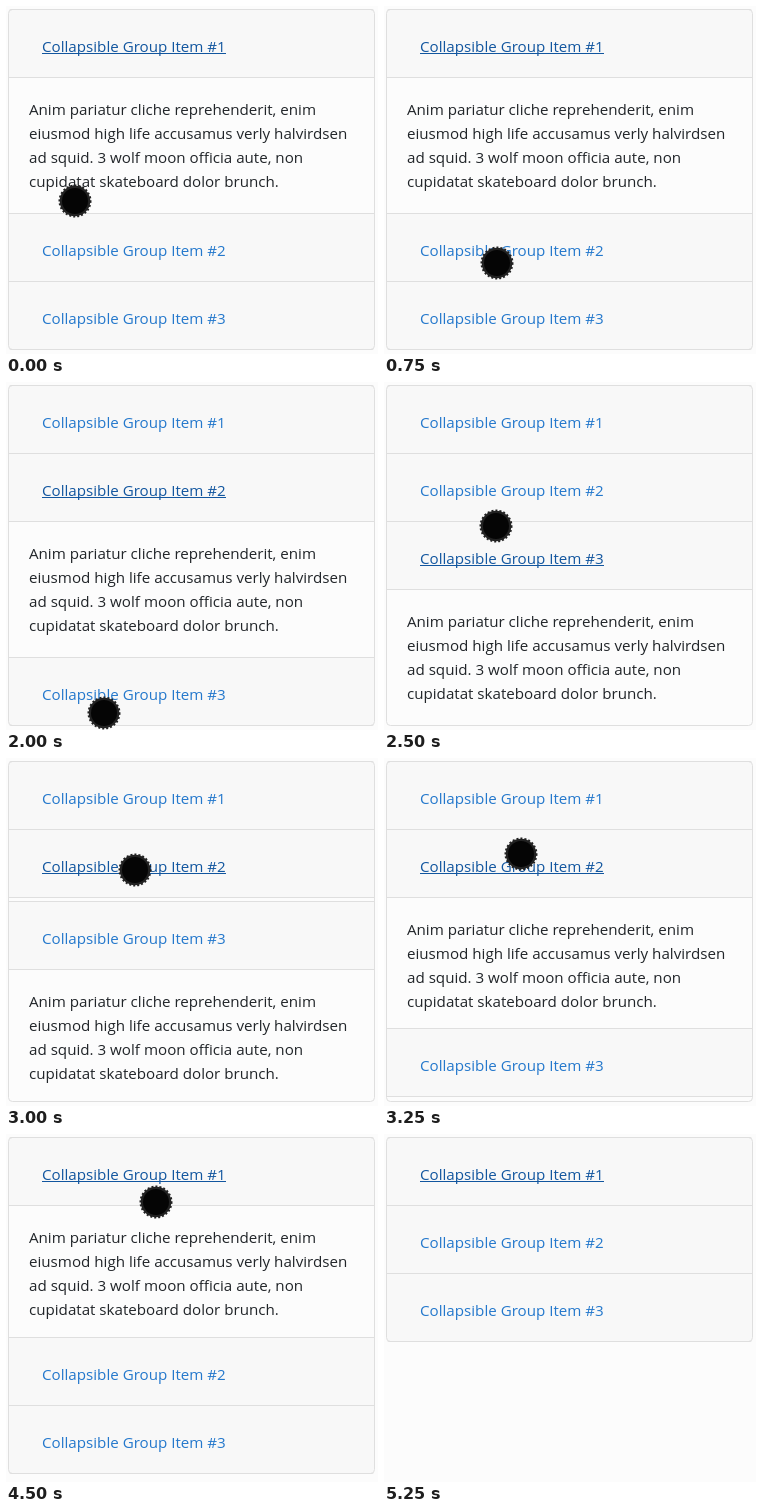
These frames come from a looping animation (372 by 348 pixels, 5.75 s). An HTML page with a canvas:

```html
<!DOCTYPE html>
<html lang="en">
<head>
<meta charset="utf-8">
<title>Accordion</title>
<style>
  html, body { margin: 0; width: 100%; height: 100%; overflow: hidden; background: #fcfcfc; }
  canvas { display: block; width: 372px; height: 348px; }
</style>
</head>
<body>
<canvas id="stage" width="372" height="348"></canvas>
<script>
const ctx = document.getElementById('stage').getContext('2d');
const LOOP = 5750, STEP = 250, SLIDE = 350, PRESS = 42, POINTER_END = 5250;
const LEFT = 2, TOP = 3, WIDTH = 366, HEADER = 68, BODY = 136;
const PAGE = '#fcfcfc', BAND = '#f8f8f8', LINE = '#dfdfdf';
const LINK = '#2478cc', FOCUS = '#12569f', INK = '#212529';
const FONT = '15.15px "Open Sans", "Noto Sans", sans-serif';
const COPY = [
  'Anim pariatur cliche reprehenderit, enim',
  'eiusmod high life accusamus verly halvirdsen',
  'ad squid. 3 wolf moon officia aute, non',
  'cupidatat skateboard dolor brunch.'
];

// A click opens its item and closes the others, or closes it when open.
const clicks = [
  { time: 1040, item: 1 },
  { time: 2045, item: 2 },
  { time: 2984, item: 1 },
  { time: 3768, item: 0 },
  { time: 4484, item: 0 }
];

// Stops of the pointer: time, x, y.
const path = [
  [0, 69, 195], [250, 152, 106], [500, 136, 297], [750, 113, 257],
  [1250, 113, 257], [1500, 97, 331], [1750, 110, 321], [2000, 98, 331],
  [2500, 112, 144], [3250, 137, 96], [3750, 151, 60], [4000, 152, 72],
  [4750, 149, 66], [5000, 148, 342]
];

const mix = (a, b, k) => a + (b - a) * k;
const clamp = v => Math.min(1, Math.max(0, v));
const bezier = (s, a, b) => 3 * a * s * (1 - s) ** 2 + 3 * b * s * s * (1 - s) + s ** 3;

// The CSS "ease" curve, solved by bisection.
function ease(x) {
  let lo = 0, hi = 1;
  for (let i = 0; i < 20; i++) {
    const mid = (lo + hi) / 2;
    if (bezier(mid, 0.25, 0.25) < x) lo = mid; else hi = mid;
  }
  return bezier(hi, 0.1, 1);
}

function panelAt(t) {
  let open = 0, focus = 0, heights = [BODY, 0, 0];
  for (const { time, item } of clicks) {
    if (t >= time - PRESS) focus = item;
    if (t < time) break;
    open = open === item ? -1 : item;
    const k = ease(clamp((t - time) / SLIDE));
    heights = heights.map((h, i) => mix(h, i === open ? BODY : 0, k));
  }
  // Opening and closing bodies always fill whole pixels.
  return { focus, heights: heights.map(Math.round) };
}

function pointerAt(t) {
  const next = path.findIndex(stop => stop[0] > t);
  if (next < 0) return path[path.length - 1].slice(1);
  const [t0, x0, y0] = path[next - 1], [t1, x1, y1] = path[next];
  const k = (t - t0) / (t1 - t0);
  return [Math.round(mix(x0, x1, k)), Math.round(mix(y0, y1, k))];
}

function rule(y) {
  ctx.fillStyle = LINE;
  ctx.fillRect(LEFT, y, WIDTH + 1, 1);
}

function drawHeader(i, y, focused) {
  const label = 'Collapsible Group Item #' + (i + 1);
  ctx.fillStyle = BAND;
  ctx.fillRect(LEFT, y, WIDTH, HEADER);
  rule(y);
  rule(y + HEADER);
  ctx.fillStyle = focused ? FOCUS : LINK;
  ctx.fillText(label, 36, y + 43);
  if (focused) ctx.fillRect(36, y + 44, Math.round(ctx.measureText(label).width), 1);
}

function drawBody(y, height) {
  ctx.save();
  ctx.beginPath();
  ctx.rect(LEFT, y + 1, WIDTH, height - 1);
  ctx.clip();
  ctx.fillStyle = INK;
  COPY.forEach((line, n) => ctx.fillText(line, 23, y + 38 + n * 24));
  ctx.restore();
}

function drawPanel({ focus, heights }) {
  const total = heights.reduce((sum, h) => sum + HEADER + h, 0);
  ctx.save();
  ctx.beginPath();
  ctx.roundRect(LEFT, TOP, WIDTH + 1, total + 1, 4);
  ctx.clip();
  let y = TOP;
  heights.forEach((height, i) => {
    drawHeader(i, y, i === focus);
    y += HEADER;
    if (height) drawBody(y, height);
    y += height;
  });
  ctx.restore();
  ctx.strokeStyle = LINE;
  ctx.lineWidth = 1;
  ctx.beginPath();
  ctx.roundRect(LEFT + 0.5, TOP + 0.5, WIDTH, total, 4);
  ctx.stroke();
}

function disc(x, y, radius, color) {
  ctx.fillStyle = color;
  ctx.beginPath();
  ctx.arc(x, y, radius, 0, Math.PI * 2);
  ctx.fill();
}

// Black dot with a ragged rim.
function drawPointer(x, y) {
  disc(x, y, 15.3, '#222');
  disc(x, y, 13, '#050505');
  ctx.save();
  ctx.strokeStyle = '#222';
  ctx.lineWidth = 2;
  ctx.setLineDash([2, 2]);
  ctx.beginPath();
  ctx.arc(x, y, 15.5, 0, Math.PI * 2);
  ctx.stroke();
  ctx.restore();
}

function draw(now) {
  const t = Math.floor((now % LOOP) / STEP) * STEP;
  ctx.fillStyle = PAGE;
  ctx.fillRect(0, 0, 372, 348);
  ctx.font = FONT;
  drawPanel(panelAt(t));
  if (t < POINTER_END) drawPointer(...pointerAt(t));
}

const start = performance.now();
function tick() {
  draw(performance.now() - start);
  requestAnimationFrame(tick);
}
tick();
</script>
</body>
</html>
```
